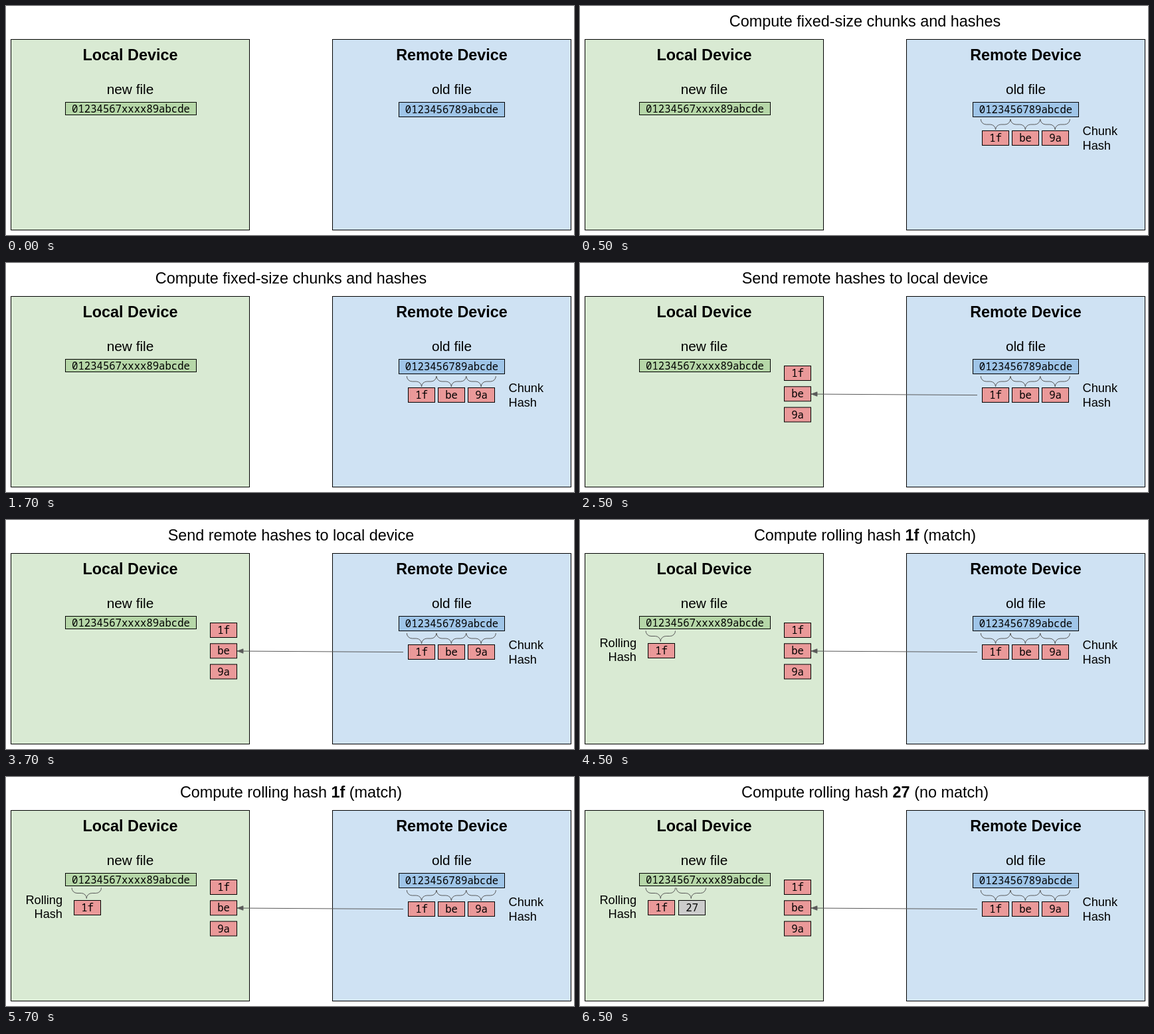
An HTML page for the animation above (8000 ms loop, 855 by 346 pixels).

```html
<!DOCTYPE html>
<html lang="en">
<head>
<meta charset="utf-8">
<title>Chunk hashes</title>
<style>
html, body { margin: 0; width: 100%; height: 100%; overflow: hidden; background: #fff; }
svg { display: block; width: 855px; height: 346px; }
text { font-family: Arial, "Liberation Sans", sans-serif; fill: #000; white-space: pre; }
.mono { font-family: "Roboto Mono", "Noto Sans Mono", monospace; font-size: 15.6px; }
.big { font-size: 23.4px; }
.name { font-size: 20.8px; }
.label { font-size: 18.2px; }
.bold { font-weight: bold; }
.mid { text-anchor: middle; }
.end { text-anchor: end; }
</style>
</head>
<body>
<svg id="stage" viewBox="0 0 855 346"></svg>
<script>
const NS = "http://www.w3.org/2000/svg";
const stage = document.getElementById("stage");
const LOOP = 8000;
const RED = "#ea9999", GREY = "#cccccc", LINE = "#595959";

function add(parent, tag, attrs, content) {
  const el = document.createElementNS(NS, tag);
  for (const key in attrs) el.setAttribute(key, attrs[key]);
  if (content) el.textContent = content;
  return parent.appendChild(el);
}

const group = () => add(stage, "g", {});

function box(parent, x, y, width, height, fill) {
  add(parent, "rect", { x, y, width, height, fill, stroke: "#000", "stroke-width": 1 });
}

function label(parent, x, y, cls, content) {
  return add(parent, "text", { x, y, class: cls }, content);
}

function hash(parent, x, y, value, fill = RED) {
  box(parent, x, y, 40, 22, fill);
  label(parent, x + 20, y + 16.5, "mono mid", value);
}

// Curly brace opening upward, its tip pointing down.
function brace(parent, x, y, width) {
  const r = 8, half = width / 2 - 2 * r;
  const d = `M${x} ${y}a${r} ${r} 0 0 0 ${r} ${r}h${half}a${r} ${r} 0 0 1 ${r} ${r}` +
            `a${r} ${r} 0 0 1 ${r} ${-r}h${half}a${r} ${r} 0 0 0 ${r} ${-r}`;
  add(parent, "path", { d, fill: "none", stroke: LINE, "stroke-width": 1 });
}

function device(x, title, fill, file) {
  const g = group(), cx = x + 179.5;
  box(g, x, 50.5, 359, 288, fill);
  label(g, cx, 82, "big bold mid", title);
  label(g, cx, 133, "name mid", file.name);
  box(g, file.x, 145.5, file.w, file.h, file.fill);
  label(g, file.x + file.w / 2, file.base, "mono mid", file.data);
}

device(7.5, "Local Device", "#d9ead3",
  { name: "new file", x: 89.5, w: 197, h: 19, base: 161, fill: "#b6d7a8", data: "01234567xxxx89abcde" });
device(491.5, "Remote Device", "#cfe2f3",
  { name: "old file", x: 591.5, w: 159, h: 22, base: 162, fill: "#9fc5e8", data: "0123456789abcde" });

const hashes = ["1f", "be", "9a"];

const chunks = group();
hashes.forEach((value, i) => {
  brace(chunks, 603.3 + 44.8 * i, 171, 44.5);
  hash(chunks, 605.5 + 45 * i, 188.5, value);
});
label(chunks, 756.5, 195, "label", "Chunk");
label(chunks, 756.5, 217, "label", "Hash");

const sent = group();
hashes.forEach((value, i) => hash(sent, 307.5, 155.5 + 31.3 * i, value));
add(sent, "path", { d: "M598 199.6L356 198.1", stroke: LINE, "stroke-width": 1 });
add(sent, "path", { d: "M348 198l9 -3.2v6.5z", fill: LINE, stroke: LINE, "stroke-width": 0.8 });

const rolling = group();
label(rolling, 85, 192, "label end", "Rolling");
label(rolling, 85, 213, "label end", "Hash");
brace(rolling, 99, 167.5, 44.5);
hash(rolling, 102.5, 186.5, "1f");

const next = group();
brace(next, 145, 167.5, 44.5);
hash(next, 148.5, 186.5, "27", GREY);

// Each step keeps the parts shown by the steps before it.
const steps = [
  { at: 0, title: [] },
  { at: 500, title: ["Compute fixed-size chunks and hashes"], part: chunks },
  { at: 2500, title: ["Send remote hashes to local device"], part: sent },
  { at: 4500, title: ["Compute rolling hash ", "1f", " (match)"], part: rolling },
  { at: 6500, title: ["Compute rolling hash ", "27", " (no match)"], part: next }
];

for (const step of steps) {
  step.text = label(stage, 429, 31, "big mid");
  step.title.forEach((run, i) => add(step.text, "tspan", i === 1 ? { class: "bold" } : {}, run));
}

const show = (el, on) => el.setAttribute("visibility", on ? "visible" : "hidden");

function render(ms) {
  const t = ms % LOOP;
  const current = steps.filter(step => step.at <= t).pop();
  for (const step of steps) {
    show(step.text, step === current);
    if (step.part) show(step.part, step.at <= t);
  }
}

const start = performance.now();
function tick() {
  render(performance.now() - start);
  requestAnimationFrame(tick);
}
tick();
</script>
</body>
</html>
```
